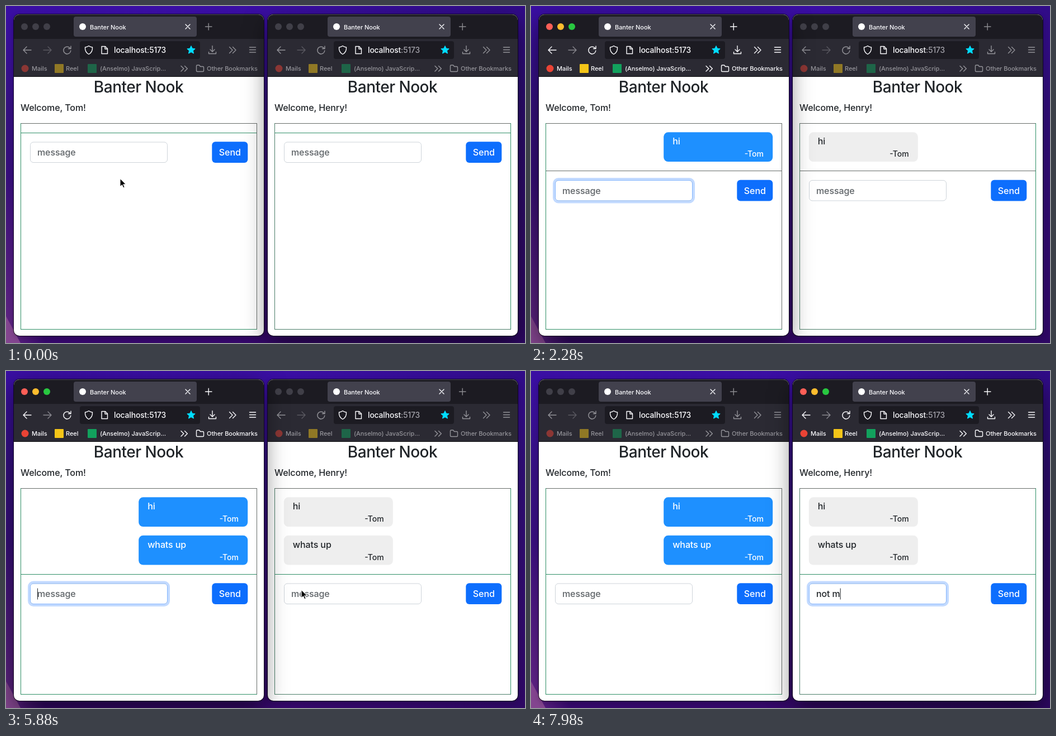
Write an HTML page that moves like this. It is 928 px wide and 604 px high and loops after 8000 ms.

```html
<!DOCTYPE html>
<html lang="en">
<head>
<meta charset="utf-8">
<title>Banter Nook</title>
<style>
  html, body { margin: 0; width: 100%; height: 100%; overflow: hidden; }
  body {
    position: relative;
    background:
      radial-gradient(ellipse 70px 300px at 0 604px, rgba(112, 48, 138, .75), transparent),
      linear-gradient(90deg, transparent 55%, rgba(30, 6, 84, .35)),
      linear-gradient(180deg, #3a0ea4, #35107f 30%, #380d74 70%, #35086a);
    font-family: Inter, "Liberation Sans", sans-serif;
  }
  body::before {
    content: ""; position: absolute; left: 0; bottom: 0; width: 26px; height: 48px;
    background: #83458f; clip-path: polygon(0 0, 100% 100%, 0 100%);
  }
  .win {
    position: absolute; top: 15px; width: 447px; height: 576px;
    border-radius: 10px; overflow: hidden; background: #fff;
    box-shadow: 0 0 0 1px rgba(0, 0, 0, .65), 0 3px 10px rgba(0, 0, 0, .25);
  }
  .win.top {
    z-index: 1;
    box-shadow: 0 0 0 1px rgba(0, 0, 0, .65), 0 14px 40px rgba(0, 0, 0, .52);
  }
  .win::after {
    content: ""; position: absolute; inset: 0; border-radius: 10px;
    box-shadow: inset 0 1px 0 rgba(255, 255, 255, .22);
  }
  #left { left: 14px; }
  #right { left: 468px; }
  .win svg { display: block; }
  text { white-space: pre; }
  .line { fill: none; stroke: #fbfbfe; stroke-width: 1.4; stroke-linecap: round; stroke-linejoin: round; }
  .small { font-size: 11px; font-weight: 500; fill: #fbfbfe; letter-spacing: -.05px; }
  .dim { opacity: .45; }
  .chrome { opacity: .5; }
  .active .chrome { opacity: 1; }
  .light { fill: #403f48; }
  .active .r { fill: #ff5f57; }
  .active .y { fill: #febc2e; }
  .active .g { fill: #28c840; }
  .title { font-size: 28px; font-weight: 550; fill: #212529; letter-spacing: -.5px; text-anchor: middle; }
  .body { font-size: 16px; font-weight: 450; fill: #212529; letter-spacing: -.1px; }
  .name { font-size: 14px; font-weight: 450; fill: #212529; text-anchor: end; }
  .mine text, .send { fill: #fff; }
  .send { font-weight: 500; text-anchor: middle; }
  .hint { fill: #5f6468; }
  #pointer { position: absolute; left: 0; top: 0; z-index: 2; overflow: visible; }
</style>
</head>
<body>
<div class="win" id="left"></div>
<div class="win" id="right"></div>
<svg id="pointer" width="1" height="1">
  <path id="arrow" d="M0 0V15L3.5 11.8L5.8 17L8.2 16L6 10.8H10.8Z" fill="#000" stroke="#fff" stroke-width="1.1"/>
  <g id="beam" fill="none" stroke-linecap="round">
    <path d="M-3-8Q0-8 0-5Q0-8 3-8M0-5V5M-3 8Q0 8 0 5Q0 8 3 8M-2 3H2" stroke="#fff" stroke-width="2.6"/>
    <path d="M-3-8Q0-8 0-5Q0-8 3-8M0-5V5M-3 8Q0 8 0 5Q0 8 3 8M-2 3H2" stroke="#111" stroke-width="1.2"/>
  </g>
</svg>
<script>
const LOOP = 8000, ROW = 68.5;
const GREEN = '#2f8f66', GRAY = '#666b69', MIXED = '#4b7d68';
const TITLE = 'Banter Nook', SENDER = 'Tom';
const $ = id => document.getElementById(id);

const star = (x, y, r) => Array.from({ length: 10 }, (_, i) => {
  const a = i * Math.PI / 5 - Math.PI / 2, d = i % 2 ? r * .48 : r;
  return (x + d * Math.cos(a)).toFixed(1) + ',' + (y + d * Math.sin(a)).toFixed(1);
}).join(' ');

const line = (d, extra = '') => `<path class="line ${extra}" d="${d}"/>`;
const small = (x, s) => `<text class="small" x="${x}" y="116">${s}</text>`;
const light = (x, c) => `<circle class="light ${c}" cx="${x}" cy="37" r="6"/>`;

// Both windows share one layout, in the coordinates of the left one.
function browser(portColor) {
  return `
  <rect x="14" y="15" width="447" height="44" fill="#1c1b22"/>
  <rect x="14" y="59" width="447" height="67" fill="#2b2a33"/>
  <rect x="14" y="126" width="447" height="1" fill="#0c0c0d"/>
  ${light(33, 'r')}${light(53, 'y')}${light(73, 'g')}
  <rect x="121" y="19" width="220" height="36" rx="4" fill="#42414d"/>
  <circle cx="137" cy="37" r="6" fill="#fff"/>
  <text class="small" x="150" y="41.5">${TITLE}</text>
  ${line('M321 33L329 41M329 33L321 41')}
  <rect x="132" y="63" width="215" height="32" rx="4" fill="#1c1b22"/>
  ${line('M148 71.5C150 73 152 73.7 154.5 74C155 80 152.5 84 148 86.5C143.5 84 141 80 141.5 74C144 73.7 146 73 148 71.5Z')}
  ${line('M171 72.5H177.5L181.5 76.5V85.5H171ZM177 73V77H181')}
  <text x="193" y="84" font-size="13.8" font-weight="500" fill="#fbfbfe" letter-spacing="-.1">localhost<tspan fill="${portColor}">:5173</tspan></text>
  <polygon points="${star(331, 79, 7.6)}" fill="#00ddff" stroke="#00ddff" stroke-linejoin="round"/>
  <g class="chrome">
    ${line('M356.5 37H368M362.2 31.3V43')}
    ${line('M45 79H31.5M37 73L31 79L37 85')}
    ${line('M67 79H80.5M75 73L81 79L75 85', 'dim')}
    ${line('M114.5 75.5A6.5 6.5 0 1 0 115.8 80M116 72V76.5H111.5')}
    ${line('M369 71.5V81.5M365 78L369 82L373 78M362.5 82.5V85.5H375.5V82.5')}
    ${line('M399.5 73.5L405 79L399.5 84.5M405.5 73.5L411 79L405.5 84.5')}
    ${line('M435.5 74H446.5M435.5 78.5H446.5M435.5 83H446.5')}
    <circle cx="34" cy="112" r="6.5" fill="#ea4335"/>${small(46, 'Mails')}
    <rect x="87" y="104" width="16" height="16" rx="1" fill="#f5c518"/>${small(107, 'Reel')}
    <rect x="146" y="104" width="16" height="16" rx="1" fill="#12a15d"/>${small(168, '(Anselmo) JavaScrip...')}
    ${line('M313 107.5L317.8 112.2L313 117M319.5 107.5L324.3 112.2L319.5 117')}
    ${line('M340.5 107.5Q340.5 106 342 106H345.5L347.5 108.5H352Q353.5 108.5 353.5 110V116Q353.5 117.5 352 117.5H342Q340.5 117.5 340.5 116Z')}
    ${small(359, 'Other Bookmarks')}
  </g>`;
}

function bubble(i, mine, message) {
  const x = mine ? 237.2 : 42.8, y = 226.3 + i * ROW;
  return `<g class="msg ${mine ? 'mine' : ''}">
    <rect x="${x}" y="${y}" width="195" height="52.8" rx="8" fill="${mine ? '#1e90ff' : '#eee'}"/>
    <text class="body" x="${x + 16}" y="${y + 21.7}">${message}</text>
    <text class="name" x="${x + 178.8}" y="${y + 43.7}">-${SENDER}</text></g>`;
}

function page(user, mine) {
  return `
  <text class="title" x="237" y="155">${TITLE}</text>
  <text class="body" x="26" y="188">Welcome, ${user}!</text>
  <path d="M26 210.5H449" stroke="${GRAY}"/>
  <path d="M26.5 210V580" stroke="${mine ? GREEN : MIXED}"/>
  <path d="M448.5 210V580" stroke="${mine ? GRAY : GREEN}"/>
  <path d="M26 579.5H449" stroke="${mine ? GREEN : MIXED}"/>
  ${bubble(0, mine, 'hi')}${bubble(1, mine, 'whats up')}
  <path class="rule" d="M27 0H448"/>
  <g class="form">
    <rect class="ring" x="41" y="241.5" width="250" height="41.5" rx="8" fill="none" stroke="#0d6efd" stroke-opacity=".25" stroke-width="4"/>
    <rect x="43" y="243.5" width="246" height="37.5" rx="6" fill="#fff"/>
    <rect x="43.5" y="244" width="245" height="36.5" rx="5.5" fill="none" stroke="#ced4da"/>
    <rect class="ring" x="43.5" y="244" width="245" height="36.5" rx="5.5" fill="none" stroke="#86b7fe"/>
    <text class="body hint" x="56" y="268">message</text>
    <text class="body value" x="56" y="268"></text>
    <rect class="caret" x="56" y="252.5" width="1" height="20" fill="#212529"/>
    <rect x="368.3" y="243.3" width="64" height="37.8" rx="6" fill="#0d6efd"/>
    <text class="body send" x="400.3" y="268">Send</text>
  </g>`;
}

// keys: [time, typed text]; blink: [caret on, caret off]; sent: arrival of each message
const chats = [
  {
    id: 'left', user: SENDER, mine: true, port: '#fbfbfe', on: 760, off: 6100, blur: 6120,
    sent: [2160, 4880],
    keys: [[1580, 'h'], [1940, 'hi'], [2160, ''], [2960, 'w'], [3300, 'wh'], [3400, 'wha'], [3600, 'what'],
      [3900, 'whats'], [4540, 'whats '], [4720, 'whats u'], [4800, 'whats up'], [4880, '']],
    blink: [[760, 1240], [1580, 2260], [2760, 4480], [4540, 5040], [5540, 6040]]
  },
  {
    id: 'right', user: 'Henry', mine: false, port: '#a3a2aa', on: 6100, off: LOOP, focus: 6120,
    sent: [2180, 4900],
    keys: [[7420, 'n'], [7540, 'no'], [7680, 'not'], [7760, 'not '], [7940, 'not m']],
    blink: [[6120, 6600], [7080, LOOP]]
  }
];

for (const c of chats) {
  c.el = $(c.id);
  c.el.innerHTML = `<svg width="447" height="576" viewBox="14 15 447 576">${browser(c.port)}${page(c.user, c.mine)}</svg>`;
  const find = s => c.el.querySelector(s);
  Object.assign(c, {
    msgs: c.el.querySelectorAll('.msg'), rings: c.el.querySelectorAll('.ring'),
    rule: find('.rule'), form: find('.form'), hint: find('.hint'), value: find('.value'), caret: find('.caret')
  });
}

const clamp = u => Math.max(0, Math.min(1, u));
const smooth = u => u * u * (3 - 2 * u);
const show = (el, yes) => { el.style.display = yes ? '' : 'none'; };

function drawChat(c, t) {
  c.el.classList.toggle('active', t >= c.on && t < c.off);
  const leftOnTop = t >= 760 && t < 6100;
  c.el.classList.toggle('top', c.mine === leftOnTop);

  const count = c.sent.filter(s => t >= s).length;
  c.msgs.forEach((m, i) => show(m, i < count));
  c.rule.setAttribute('transform', `translate(0 ${Math.round(226.5 + count * ROW) + .5})`);
  c.rule.setAttribute('stroke', count === 1 ? GRAY : GREEN);
  c.form.setAttribute('transform', `translate(0 ${count * ROW})`);

  const inn = smooth(clamp((t - (c.focus || c.on)) / 150));
  const out = c.blur ? smooth(clamp((t - c.blur) / 150)) : 0;
  c.rings.forEach(r => { r.style.opacity = inn - out; });

  let typed = '';
  for (const [at, s] of c.keys) if (t >= at) typed = s;
  if (c.typed !== typed) {
    c.typed = typed;
    c.value.textContent = typed;
    c.caret.setAttribute('x', 56 + (typed ? c.value.getComputedTextLength() : 0));
  }
  show(c.hint, !typed);
  show(c.caret, c.blink.some(([a, b]) => t >= a && t < b));
}

// start, end, from x, from y, to x, to y
const moves = [
  [20, 520, 204, 309, 208, 264],
  [5460, 5880, 208, 264, 528, 392],
  [5880, 6080, 528, 392, 551, 408]
];

function drawPointer(t) {
  const m = moves.filter(m => t >= m[0]).pop() || moves[0];
  const u = smooth(clamp((t - m[0]) / (m[1] - m[0])));
  const x = m[2] + (m[4] - m[2]) * u, y = m[3] + (m[5] - m[3]) * u;
  $('pointer').style.transform = `translate(${x}px, ${y}px)`;
  show($('pointer'), t < 1580 || (t >= 5460 && t < 7420));
  const beam = (t >= 760 && t < 1580) || t >= 6100;
  show($('beam'), beam);
  show($('arrow'), !beam);
}

let start;
function frame(now) {
  start ??= now;
  const t = (now - start) % LOOP;
  chats.forEach(c => drawChat(c, t));
  drawPointer(t);
  requestAnimationFrame(frame);
}
requestAnimationFrame(frame);
</script>
</body>
</html>
```
